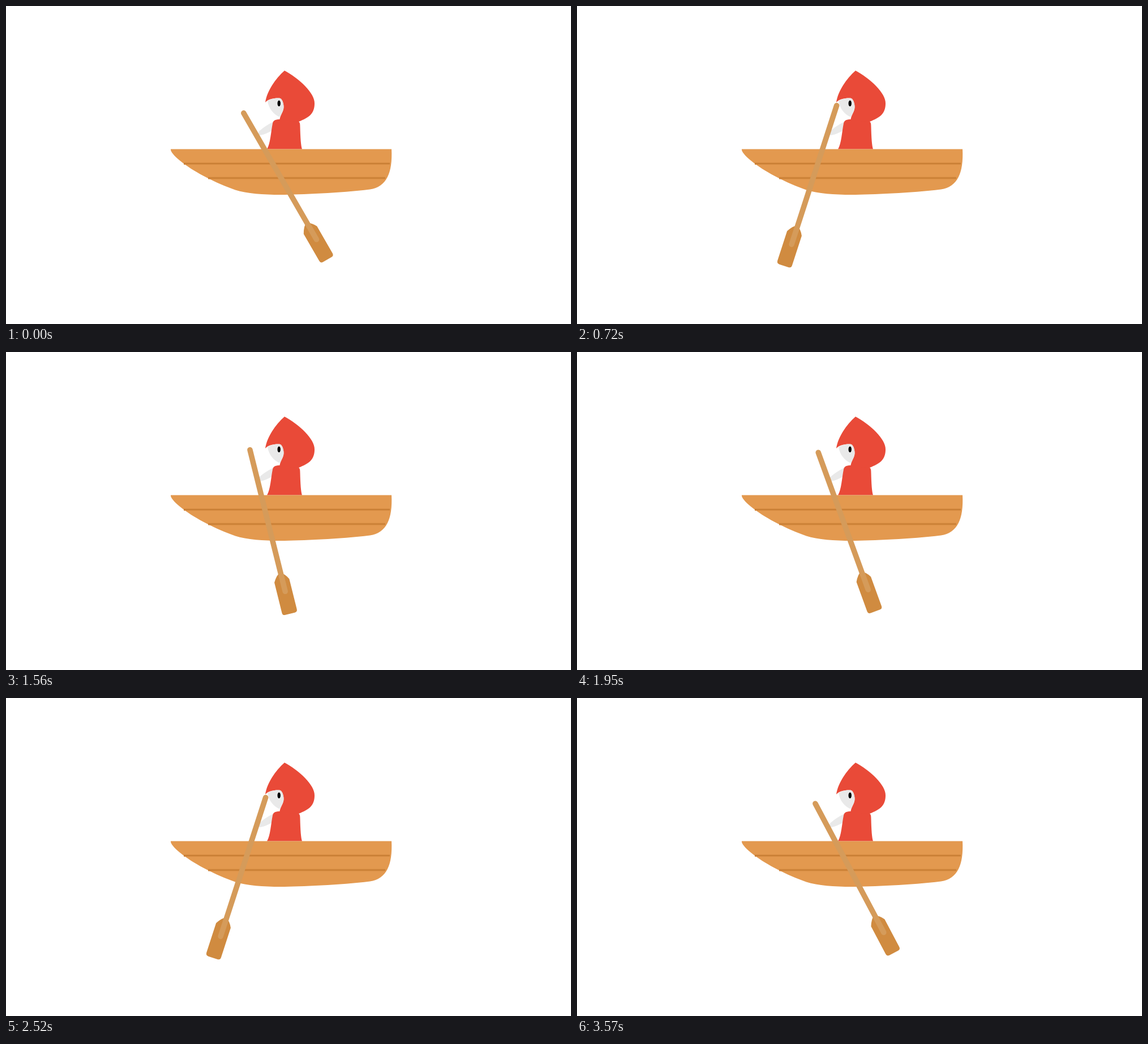
Recreate the animation shown at these times as an HTML page with a canvas. Size 998 by 561 pixels, loop 3.6 s.

```html
<!DOCTYPE html>
<html lang="en">
<head>
<meta charset="utf-8">
<title>Rowing</title>
<style>
  html, body { margin: 0; width: 100%; height: 100%; overflow: hidden; background: #fff; }
  canvas { display: block; }
</style>
</head>
<body>
<canvas id="stage" width="998" height="561"></canvas>
<script>
const ctx = document.getElementById('stage').getContext('2d');
const STROKE_MS = 1800;
const MAX_ANGLE = 30;

const shapes = {
  hull: new Path2D('M291 252.5H681C683 295 672 319 643 323.5C590 330 520 332.5 485 333C455 333 425 331 405 324.5C370 312 335 294 314 278C302 269 290 258 291 252.5Z'),
  arm: new Path2D('M471 205Q458 211 447 221Q444 228 449 228Q460 226 471 219Z'),
  body: new Path2D('M461 252.5C467 243 468 222 471 207C472 201 477 200 484 200L515 203C519 204 519.5 207 519.5 213C520 233 521 247 523 252.5Z'),
  hood: new Path2D('M458 170C461 150 476 128 492 114C518 128 546 154 545 172C545 190 535 197 517 204L483 203C484 191 491 187 490.5 177C490 169 487 163 483 162.5C474 162 463 164 458 170Z'),
  cheek: new Path2D('M462 167.5C467 164 477 162 483 162.5C487 163 490 169 490.5 177C491 184 486 190 484 196C473 192 464 181 462 167.5Z'),
  // Oar parts are relative to the middle of the shaft.
  blade: new Path2D('M-14.8 109Q-8 97 -1.2 94.5Q7 98 12.3 109V164Q12.3 169 7.3 169H-9.8Q-14.8 169 -14.8 164Z')
};

function fill(shape, color) {
  ctx.fillStyle = color;
  ctx.fill(shape);
}

function line(x1, y1, x2, y2, width, color, cap = 'butt') {
  ctx.strokeStyle = color;
  ctx.lineWidth = width;
  ctx.lineCap = cap;
  ctx.beginPath();
  ctx.moveTo(x1, y1);
  ctx.lineTo(x2, y2);
  ctx.stroke();
}

function drawRower() {
  fill(shapes.arm, '#e9e9e9');
  fill(shapes.body, '#e94a38');
  fill(shapes.hood, '#e94a38');
  fill(shapes.cheek, '#e9e9e9');
  ctx.fillStyle = '#000';
  ctx.beginPath();
  ctx.ellipse(482.2, 171.8, 2.7, 5.3, 0, 0, Math.PI * 2);
  ctx.fill();
}

function drawBoat() {
  fill(shapes.hull, '#e3994f');
  for (const [x1, x2, y] of [[314, 678, 278], [357, 670, 303.5]]) {
    line(x1, y, x2, y, 4, '#d88d43');
    line(x1, y, x2, y, 2, '#c97f35');
  }
}

function drawOar(time) {
  const phase = (time % STROKE_MS) / STROKE_MS;
  const angle = MAX_ANGLE * (Math.abs(4 * phase - 2) - 1);
  ctx.save();
  ctx.translate(443.2 + 1.831 * angle, 324.6);
  ctx.rotate(-angle * Math.PI / 180);
  ctx.translate(0, -28);
  fill(shapes.blade, '#d08b40');
  line(0, -128.7, 0, 128.7, 9.6, '#d59b5a', 'round');
  ctx.restore();
}

function draw(time) {
  ctx.fillStyle = '#fff';
  ctx.fillRect(0, 0, 998, 561);
  drawRower();
  drawBoat();
  drawOar(time);
}

let start;
function tick(now) {
  start ??= now;
  draw(now - start);
  requestAnimationFrame(tick);
}
draw(0);
requestAnimationFrame(tick);
</script>
</body>
</html>
```
